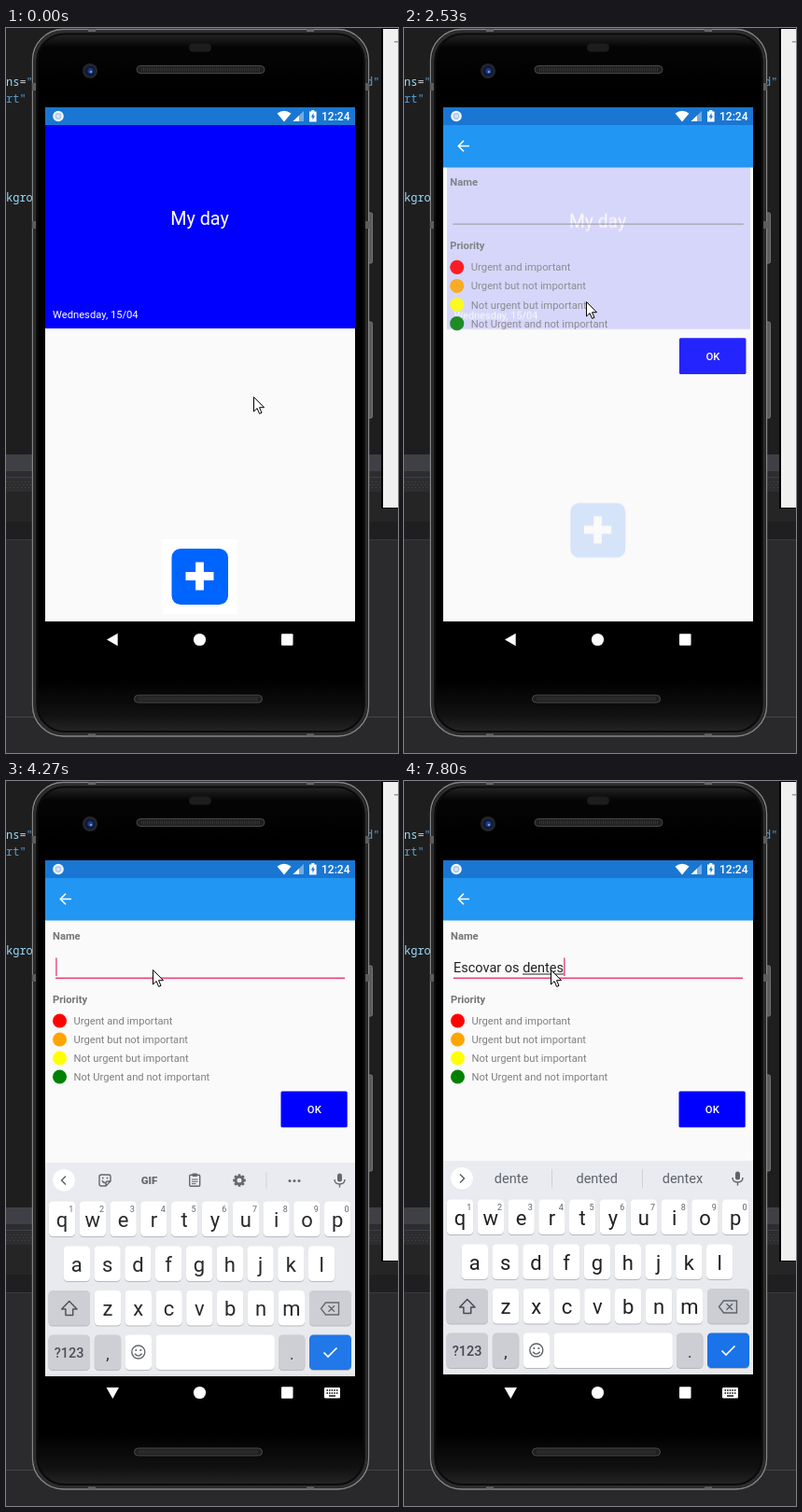
These frames come from a looping animation (420 px wide and 777 px high, 8 s). An HTML page:

```html
<!DOCTYPE html>
<html lang="en">
<head>
<meta charset="utf-8">
<title>My day</title>
<style>
html, body { margin: 0; height: 100%; overflow: hidden; background: #1e1e1e; }
svg { display: block; width: 420px; height: 777px; }
text { font-family: Roboto, sans-serif; white-space: pre; }
.code { font-family: "Noto Sans Mono", monospace; font-weight: 500; }
</style>
</head>
<body>
<svg id="stage" viewBox="0 0 420 777"></svg>
<script>
const rect = (x, y, w, h, fill, rx = 0, more = '') =>
  `<rect x="${x}" y="${y}" width="${w}" height="${h}" rx="${rx}" fill="${fill}" ${more}/>`;
const disc = (x, y, r, fill, more = '') =>
  `<circle cx="${x}" cy="${y}" r="${r}" fill="${fill}" ${more}/>`;
const text = (x, y, size, str, fill, more = '') =>
  `<text x="${x}" y="${y}" font-size="${size}" fill="${fill}" ${more}>${str}</text>`;
const shape = (d, fill, more = '') => `<path d="${d}" fill="${fill}" ${more}/>`;
const line = (d, color, width = 1, more = '') =>
  shape(d, 'none', `stroke="${color}" stroke-width="${width}" ${more}`);
const group = (id, ...parts) => `<g id="${id}">${parts.join('')}</g>`;
const mid = 'text-anchor="middle"', medium = 'font-weight="500"', bold = 'font-weight="700"';
const INK = '#5f6368', PINK = '#e8447a';

function desktop() {
  const code = (x, y, str, fill) => text(x, y, 12, str, fill, 'class="code"');
  const dots = [486, 489, 492].map((y, i) =>
    line(`M${i % 2 * 2} ${y + .5}H402`, '#47474b', 1, 'stroke-dasharray="1 3"')).join('');
  return rect(0, 0, 420, 777, '#1e1e1e')
    + rect(0, 457, 420, 18, '#3f3f46') + rect(0, 475, 420, 22, '#2d2d30')
    + rect(0, 481, 420, 1, '#3f3f46') + dots
    + rect(0, 497, 420, 32, '#252526') + rect(0, 529, 420, 19, '#1f1f21')
    + rect(0, 548, 420, 229, '#2b2b2e') + rect(0, 548, 420, 1, '#3a3a3e')
    + rect(0, 738, 420, 1, '#444448') + rect(0, 739, 420, 38, '#29292c')
    + code(0, 62, 'ns<tspan fill="#c8c8c8">=</tspan><tspan fill="#569cd6">"</tspan>', '#9cdcfe')
    + code(0, 80, 'rt"', '#569cd6') + code(0, 186, 'kgrou', '#9cdcfe')
    + code(386, 62, 'd"', '#569cd6')
    + rect(402, 0, 18, 515, '#000') + rect(404, 1, 16, 513, '#f0f0f0')
    + rect(416, 14, 4, 1.5, '#999');
}

function phone() {
  const grille = (x, y) => rect(x, y, 137, 8, '#202020', 4, 'stroke="#484848"')
    + line(`M${x + 5} ${y + 4}h127`, '#343434', 4, 'stroke-dasharray="1 1"');
  const side = (y, h) => rect(386.5, y, 6, h, '#5a5a5a', 1.5, 'stroke="#858585" stroke-width=".8"');
  return `<defs>
    <linearGradient id="body" x2="0" y2="1">
      <stop stop-color="#303030"/><stop offset=".025" stop-color="#050505"/>
      <stop offset=".08"/><stop offset=".92"/>
      <stop offset=".97" stop-color="#111"/><stop offset="1" stop-color="#2a2a2a"/>
    </linearGradient>
    <clipPath id="screen">${rect(42, 85, 332, 551, '#000')}</clipPath></defs>`
    + side(198, 54) + side(315, 103)
    + rect(28.5, 1.5, 360, 757.5, 'url(#body)', 33, 'stroke="#858585" stroke-width="1.4"')
    + rect(31, 4, 355, 752.5, 'none', 31, 'stroke="#2c2c2c" stroke-width="3"')
    + rect(33.5, 6.5, 350, 747.5, 'none', 29, 'stroke="#0b0b0b" stroke-width="2"')
    + [59, 207].map(y => rect(28, y, 4, 8, '#5c5c5c') + rect(385, y, 4, 8, '#5c5c5c')).join('')
    + [88, 322].map(x => rect(x, 1, 8, 3, '#666') + rect(x, 756.5, 8, 3, '#666')).join('')
    + rect(196, 16.5, 24, 9, '#1d1d1d', 4.5)
    + grille(140, 40.5) + grille(137.5, 715)
    + disc(90, 46, 8, '#24262c') + disc(90, 46, 5.5, '#101a38')
    + disc(90.5, 46, 3, '#203a80') + disc(91, 47, 1.3, '#6d96e8');
}

const statusBar = () => rect(42, 85, 332, 19, '#1976d2')
  + disc(56, 94.5, 5.8, '#f2f6fb') + disc(56, 94.5, 3.4, '#a9c8ec')
  + disc(56, 94.5, 2, '#d7e6f7')
  + shape('M290.5 91.5Q298 86 305.5 91.5L298 100.5Z', '#fff')
  + shape('M319 89V100H307.5Z', '#fff', 'opacity=".4"')
  + shape('M314 93.8V100H307.5Z', '#fff')
  + shape('M325 89.5h2.2v-1.5h3.2v1.5h2.2V100.5h-7.6Z', '#fff')
  + shape('M329.5 91L326.8 95.4h1.7v3.2L331 94.2h-1.5Z', '#1976d2')
  + text(338, 98.7, 12, '12:24', '#fff', medium);

const home = () => group('home',
  rect(42, 104, 332, 218, '#00f'),
  text(207.5, 210.5, 19.8, 'My day', '#fff', mid),
  text(50, 311, 11.2, 'Wednesday, 15/04', '#fff'),
  group('add',
    rect(167.5, 548, 80.5, 80, '#fff'),
    rect(177.5, 558, 60.5, 60, '#0064ff', 9.5),
    line('M192.5 587.5H222.5M207.5 572.5V602.5', '#fff', 8.8)));

function form() {
  const levels = [['red', 'Urgent and important'], ['orange', 'Urgent but not important'],
    ['yellow', 'Not urgent but important'], ['green', 'Not Urgent and not important']];
  return group('form',
    text(50, 170, 11.2, 'Name', '#757575', bold),
    text(50, 238, 11.2, 'Priority', '#757575', bold),
    ...levels.map(([color, label], i) => disc(57.5, 257, 7.5, color)
      .replace('cy="257"', `cy="${257 + 20 * i}"`)
      + text(72.5, 261 + 20 * i, 11.2, label, '#808080')),
    rect(294.5, 332.5, 71.2, 38.7, '#00f', 1.5),
    text(330.3, 356, 11.3, 'OK', '#fff', mid + medium),
    rect(53, 210.5, 310, 1, '#8c8c8c', 0, 'id="rule"'),
    text(53, 205, 14.5, '', '#212121', 'id="entry"'),
    rect(53, 206.5, 0, 1, '#212121', 0, 'id="under"'),
    rect(53, 189.5, 1.4, 19.5, PINK, 0, 'id="caret"'));
}

const header = () => group('header', rect(42, 104, 332, 45.5, '#2196f3'),
  line('M70 126.5H58.5M64 120.8L58.3 126.5L64 132.2', '#fff', 1.6));

function keyboard() {
  const GREY = '#ccced4';
  const key = (x, y, w, fill = '#fff') => rect(x, y + 1, w, 37.5, '#b5b8be', 4.5) + rect(x, y, w, 37.5, fill, 4.5);
  const row = (letters, x, y, digits = '') => [...letters].map((c, i) => {
    const cx = x + i * 32.8;
    return key(cx - 14.2, y, 28.4) + text(cx, y + 27, 22, c, '#202124', mid + ' class="key"')
      + (digits ? text(cx + 9.8, y + 11, 9, digits[i], INK, mid) : '');
  }).join('');
  const cog = Array.from({length: 8}, (_, i) => rect(248.6, 419.2, 2.8, 4, INK, .5, `transform="rotate(${i * 45} 250 426)"`)).join('');
  const tools = group('tools',
    line('M64 421.5L59.5 426L64 430.5', INK, 1.5),
    line('M102 420h8q2 0 2 2v5l-5 5h-5q-2 0 -2 -2v-8q0 -2 2 -2M112 427h-3q-2 0 -2 2v3M103 426q1 3 3.5 2.5', INK, 1.4),
    disc(103.8, 423.5, .9, INK), disc(108.5, 423.5, .9, INK),
    text(153.5, 430, 11.5, 'GIF', INK, mid + 'font-weight="900"'),
    rect(196.7, 420.2, 11, 12, 'none', 1, `stroke="${INK}" stroke-width="1.4"`),
    rect(199.5, 418.5, 5.5, 3.5, INK, 1),
    line('M199 425h6.5M199 427.3h6.5M199 429.6h4.5', INK),
    cog, disc(250, 426, 3.9, 'none', `stroke="${INK}" stroke-width="2.6"`),
    rect(278.5, 417, 1, 18, '#cfd1d6'),
    ...[304, 309, 314].map(x => disc(x, 426.5, 1.5, INK)));
  const words = group('words',
    line('M60 421.5L64.5 426L60 430.5', INK, 1.5),
    rect(158, 416, 1, 20, '#cfd1d6'), rect(255, 416, 1, 20, '#cfd1d6'),
    ...[115, 206.7, 298.5].map(x => text(x, 431, 14.5, '', INK, mid + ' class="word"')));
  return group('keyboard',
    rect(42, 407, 332, 229, '#e8eaed'), rect(42, 407, 332, 39, '#e9ebf0'),
    disc(62, 426.5, 12, '#d8dadf'), disc(62, 426, 12, '#fff'), tools, words,
    rect(355, 418.5, 5, 9, INK, 2.5),
    line('M352 425q0 5 5.5 5t5.5 -5M357.5 430v3.5', INK, 1.4),
    row('qwertyuiop', 60, 448.5, '1234567890'),
    row('asdfghjkl', 75.8, 496.5), row('zxcvbnm', 109, 544),
    key(45.5, 544, 44.5, GREY), key(325, 544, 45, GREY),
    shape('M67.8 555.5L76 564H71.7V570.5H63.9V564H59.6Z', 'none', `id="shift" stroke="#4a4d52" stroke-width="1.5" stroke-linejoin="round"`),
    line('M342.5 557h14v13h-14l-5 -6.5ZM345.5 560.3l6.5 6.5M352 560.3l-6.5 6.5', INK, 1.4),
    key(45.5, 591.5, 44.5, GREY), text(67.7, 615.5, 14.5, '?123', '#45494e', mid + medium),
    key(94.8, 591.5, 28.4, GREY), text(109, 618, 17, ',', '#202124', mid),
    key(127.6, 591.5, 28.4),
    disc(141.8, 610, 7, 'none', `stroke="${INK}" stroke-width="1.4"`),
    disc(139.3, 608, 1.1, INK), disc(144.3, 608, 1.1, INK),
    line('M138 611.8q3.8 4.6 7.6 0', INK, 1.4),
    key(160.4, 591.5, 127.5), key(292, 591.5, 28.4, GREY),
    text(306.2, 618, 17, '.', '#202124', mid),
    key(325, 591.5, 45, '#1a73e8'),
    line('M340.5 610.5L345 615L354.5 605.5', '#fff', 1.7));
}

const navIcons = () => shape('', '#fff', 'id="back"') + disc(207.5, 655.5, 6.6, '#fff')
  + rect(295, 649.3, 12.5, 12.5, '#fff', 1)
  + group('imeIcon', rect(341, 650, 17, 11.5, '#fff', 1.3),
    line('M343.5 653h12M343.5 656h12', '#000', 1.5, 'stroke-dasharray="1.5 1.1"'),
    line('M346 659h7', '#000', 1.4));

const cursor = () => group('cursor', shape('M.5 .5V16L4.1 12.6L6.6 18.4L9 17.3L6.5 11.7H11.5Z',
  '#fff', 'stroke="#000" stroke-linejoin="round"'));

const stage = document.getElementById('stage');
stage.innerHTML = desktop() + phone()
  + `<g clip-path="url(#screen)">${rect(42, 85, 332, 551, '#fafafa')}${home()}${form()}${header()}${statusBar()}</g>`
  + rect(42, 636, 332, 39, '#000') + keyboard() + navIcons() + cursor();

const el = {};
stage.querySelectorAll('[id]').forEach(node => el[node.id] = node);
const keys = [...stage.querySelectorAll('.key')], hints = stage.querySelectorAll('.word');
const set = (node, attrs) => { for (const k in attrs) node.setAttribute(k, attrs[k]); };
const show = (node, on) => node.style.display = on ? '' : 'none';
const scaleAt = (x, y, s) => `translate(${x} ${y}) scale(${s}) translate(${-x} ${-y})`;

const LOOP = 8000, PUSH = 2425, FOCUS = 3270, IME = 3730, RISE = 4130;
const moves = [[0, 265, 395], [70, 265, 400], [530, 265, 400], [600, 268, 404], [670, 268, 404],
  [730, 271, 408], [800, 271, 408], [1470, 226, 556], [1670, 222, 576], [1870, 215, 586],
  [2000, 215, 586], [2530, 195, 293], [2870, 160, 214], [3000, 153, 199], [3400, 153, 199],
  [3470, 157, 202], [LOOP, 157, 202]];
const phrase = 'Escovar os dentes';
const strokes = [6070, 6400, 6470, 6600, 6670, 6800, 6870, 6930, 7070, 7130, 7200, 7330, 7400, 7530, 7600, 7670, 7800];
const blinks = [FOCUS, IME, 4200, 4730, 5270, 5730, 6070];

function pointer(t) {
  const i = moves.findIndex(m => m[0] > t);
  const [t0, x0, y0] = moves[i - 1], [t1, x1, y1] = moves[i];
  const p = (t - t0) / (t1 - t0);
  return [Math.round(x0 + (x1 - x0) * p), Math.round(y0 + (y1 - y0) * p)];
}

function drawPages(t) {
  const pushed = t >= PUSH;
  const left = 1 - Math.max(0, Math.min(1, (t - PUSH) / 220));
  const fade = left ** 3, zoom = left ** 5;
  set(el.home, { opacity: fade, transform: scaleAt(208, 347, .975 + .025 * zoom) });
  set(el.add, { transform: `translate(0 ${pushed ? -45 : 0})` });
  set(el.form, { opacity: 1 - fade, transform: scaleAt(208, 392.5, 1 + .125 * zoom) });
  show(el.form, pushed);
  show(el.header, pushed);
}

function drawEntry(t) {
  const focused = t >= FOCUS;
  set(el.rule, { fill: focused ? PINK : '#8c8c8c', height: focused ? 1.6 : 1 });
  const typed = phrase.slice(0, strokes.filter(s => s <= t).length);
  if (el.entry.textContent !== typed) el.entry.textContent = typed;
  const end = 53 + (typed ? el.entry.getComputedTextLength() : 0);
  const from = typed.lastIndexOf(' ') + 1;
  const start = from < typed.length ? el.entry.getStartPositionOfChar(from).x : end;
  set(el.under, { x: start, width: end - start });
  set(el.caret, { x: end + .2 });
  show(el.caret, blinks.filter(b => b <= t).length % 2);
  return typed;
}

function drawKeyboard(t, typed) {
  const gap = Math.exp((RISE - t) / 47);
  show(el.keyboard, t >= RISE);
  set(el.keyboard, { transform: `translate(0 ${Math.round(39 * gap)})`, opacity: 1 - .8 * Math.min(1, gap) });
  const upper = t >= 4400 && t < 6130;
  for (const k of keys) {
    const c = k.textContent;
    k.textContent = upper ? c.toUpperCase() : c.toLowerCase();
  }
  set(el.shift, { fill: upper ? '#4a4d52' : 'none' });
  const hinting = t >= 6130;
  show(el.tools, !hinting);
  show(el.words, hinting);
  const word = typed.trim().split(' ').pop();
  const stem = word.length > 1 ? word.slice(0, -1) : word;
  ['', 'd', 'x'].forEach((tail, i) => hints[i].textContent = stem + tail);
}

function draw(t) {
  drawPages(t);
  drawKeyboard(t, drawEntry(t));
  set(el.back, { d: t >= IME ? 'M107.5 650H121L114.3 662Z' : 'M119.7 648.7V662.3L108 655.5Z' });
  show(el.imeIcon, t >= IME);
  set(el.cursor, { transform: `translate(${pointer(t)})` });
}

let begin;
function tick(now) {
  begin ??= now;
  // The screen refreshes 15 times a second.
  const frame = Math.floor(((now - begin) % LOOP + 5) * .015) % 120;
  draw(Math.round(frame / .15) * 10);
  requestAnimationFrame(tick);
}
draw(0);
requestAnimationFrame(tick);
</script>
</body>
</html>
```
